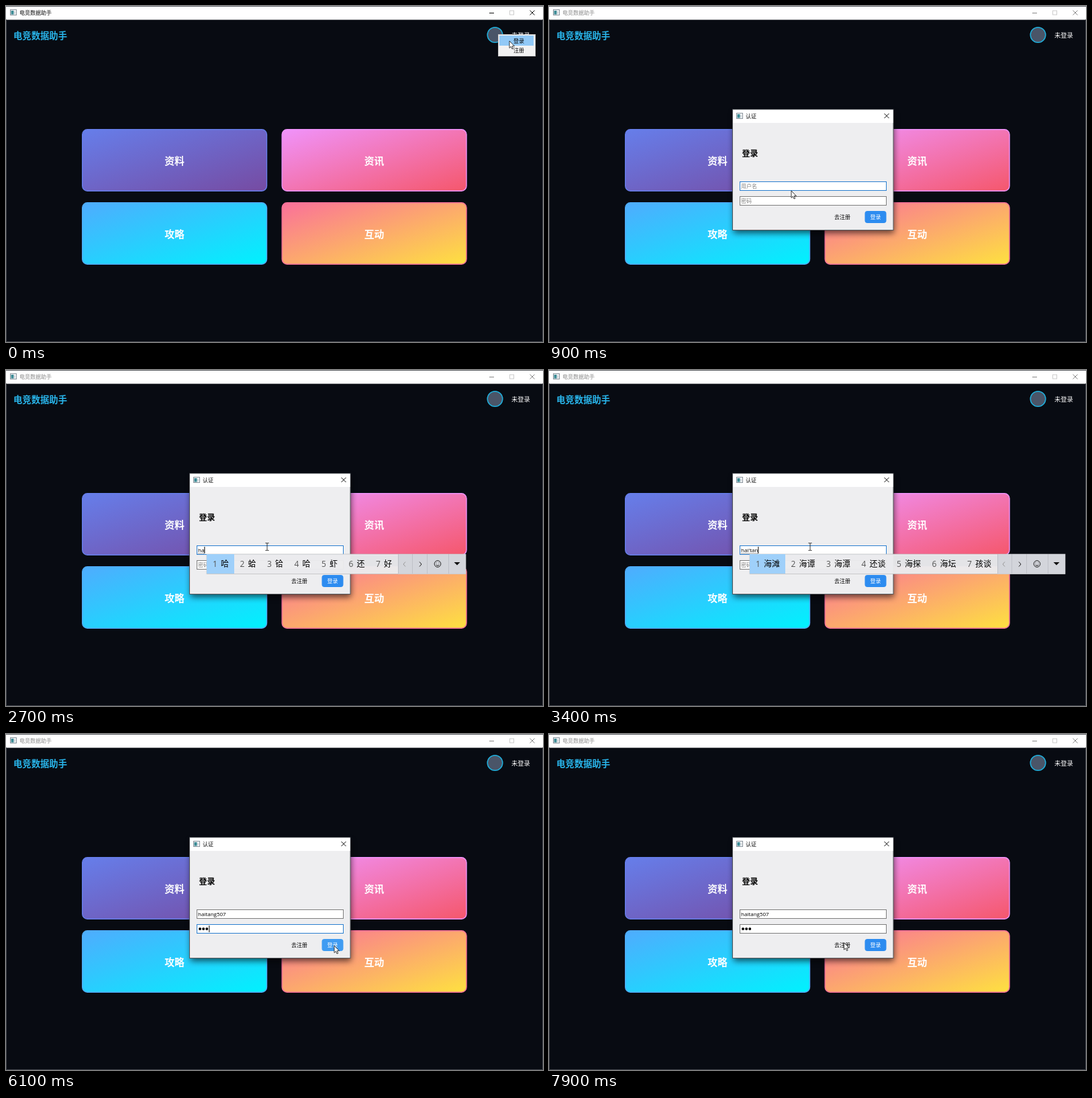
Recreate the animation shown at these times as an HTML page. Size 800 by 500 pixels, loop 8000 ms.

```html
<!DOCTYPE html>
<html lang="zh-CN">
<head>
<meta charset="utf-8">
<style>
html, body { margin: 0; width: 100%; height: 100%; overflow: hidden; background: #080b12; }
svg { display: block; width: 800px; height: 500px; }
text { font-family: "Open Sans", "Noto Sans CJK SC", "Noto Sans CJK", sans-serif; font-size: 8px; white-space: pre; }
.bold { font-weight: 700; }
</style>
</head>
<body>
<svg id="stage" viewBox="0 0 800 500">
  <defs>
    <filter id="shadow" x="-20%" y="-20%" width="140%" height="150%"><feGaussianBlur stdDeviation="5"/></filter>
    <g id="appIcon">
      <rect x=".5" y=".5" width="9" height="8" fill="#f4f6f8" stroke="#8b949c"/>
      <rect x="1.5" y="2" width="4" height="5.5" fill="#3b8a94"/>
      <path d="M7 3v4" stroke="#b5bdc4"/>
    </g>
    <path id="cross" d="M-3.5-3.5 3.5 3.5M3.5-3.5-3.5 3.5" fill="none"/>
  </defs>
  <rect width="800" height="500" fill="#080b12"/>
  <rect width="800" height="20.5" fill="#fff"/>
  <path d="M.5 20V499.5H799.5V20" fill="none" stroke="#42464c"/>
  <path d="M0 .5H800" stroke="#5c5f63"/>
  <use href="#appIcon" x="6" y="5"/>
  <text id="caption" x="20" y="13">电竞数据助手</text>
  <g id="controls" stroke="#111">
    <path d="M720 10.5h7"/>
    <use href="#cross" x="784" y="10"/>
  </g>
  <rect x="750.5" y="7" width="6" height="6" fill="none" stroke="#ccc"/>
  <text class="bold" x="11" y="48.5" fill="#29b6ec" style="font-size:13.33px">电竞数据助手</text>
  <circle cx="728.5" cy="43" r="11.3" fill="#4a5568" stroke="#20afdc" stroke-width="1.5"/>
  <text x="753" y="46.6" fill="#fff" style="font-size:9.3px">未登录</text>
  <g id="cards"></g>

  <g id="menu">
    <rect x="733.5" y="42.5" width="55" height="32" fill="#f2f2f2" stroke="#c8c8c8"/>
    <rect x="735" y="44" width="51" height="15" fill="#91c9f7"/>
    <text x="756" y="54.5">登录</text>
    <text x="756" y="69">注册</text>
  </g>

  <g id="dialog">
    <rect x="275" y="159" width="239" height="179" opacity=".6" filter="url(#shadow)"/>
    <rect x="273.5" y="154" width="239.5" height="179.5" fill="#eeeef0" stroke="#55585c"/>
    <rect x="274" y="154.5" width="238.5" height="19.5" fill="#fff"/>
    <use href="#appIcon" x="279" y="159"/>
    <text x="293" y="166.5">认证</text>
    <use href="#cross" x="503" y="163.5" stroke="#111"/>
    <text class="bold" x="287.5" y="223.5" style="font-size:12px">登录</text>
    <rect id="userBox" x="284.5" y="261.5" width="218" height="13" fill="#fff"/>
    <rect id="passBox" x="284.5" y="283.5" width="218" height="13" fill="#fff"/>
    <text id="user" x="286" y="271"></text>
    <path id="underline" stroke="#111" stroke-width=".8" stroke-dasharray="1 1"/>
    <text id="passHint" x="286" y="293" fill="#858585">密码</text>
    <g id="dots"></g>
    <path id="caret" stroke="#000"/>
    <text x="425" y="317">去注册</text>
    <rect id="loginButton" x="470.5" y="305" width="32" height="18" rx="4"/>
    <text x="478.5" y="317" fill="#fff">登录</text>
  </g>

  <g id="ime"></g>
  <path id="arrow" d="M0 0V10.5L2.4 8.3 4 12 5.7 11.3 4.1 7.7H7.4Z" fill="#fff" stroke="#111" stroke-width=".8"/>
  <path id="beam" d="M-2.5-5.5H-.7L0-5 .7-5.5H2.5M0-5V5M-2.5 5.5H-.7L0 5 .7 5.5H2.5" fill="none" stroke="#222" stroke-width=".9"/>
</svg>
<script>
const LOOP = 8000;
const OPEN = 300, FOCUS_PASS = 4800, CLICK_LOGIN = 6400;
const $ = id => document.getElementById(id);
const show = (id, on) => $(id).setAttribute('display', on ? 'inline' : 'none');
const set = (id, attrs) => { for (const k in attrs) $(id).setAttribute(k, attrs[k]); };

const CARDS = [
  ['资料', 113, 183, '#667eea', '#764ba2'],
  ['资讯', 410.5, 183, '#f093fb', '#f5576c'],
  ['攻略', 113, 292, '#4facfe', '#00f2fe'],
  ['互动', 410.5, 292, '#fa709a', '#fee140']
];
$('cards').innerHTML = CARDS.map(([label, x, y, from, to], i) => `
  <linearGradient id="fill${i}" x2="1" y2="1"><stop stop-color="${from}"/><stop offset="1" stop-color="${to}"/></linearGradient>
  <rect x="${x + .7}" y="${y + .7}" width="274.8" height="91.6" rx="7.5" fill="url(#fill${i})" stroke="${from}" stroke-width="1.4"/>
  <text class="bold" x="${x + 138}" y="${y + 52.5}" fill="#fff" text-anchor="middle" style="font-size:14.8px">${label}</text>`).join('');

// [time, text, candidates while composing]
const TYPING = [
  [0, ''],
  [2500, 'h', '和 会 好 还 很 后 或'],
  [2650, 'ha', '哈 蛤 铪 哈 虾 还 好'],
  [2800, 'hai', '还 海 害 孩 嗨 亥 骇'],
  [3000, "hai't", '海滩 海棠 海图 海豚 还挺 海涛 海天'],
  [3150, "hai'ta", '海塔 还他 害她 还它 海獭 孩他 嗨他'],
  [3300, "hai'tan", '海滩 海谭 海潭 还谈 海探 海坛 孩谈'],
  [3500, "hai'tang", '海棠 海塘 海糖 还烫 海堂 害糖 海唐'],
  [3700, 'haitang'],
  [3900, 'haitang5'],
  [4050, 'haitang50'],
  [4250, 'haitang507']
];
const PASS_KEYS = [5150, 5350, 5600];
const POINTER = [
  [0, 750, 52], [150, 750, 52], [900, 361, 275], [1300, 389, 263], [4450, 389, 263],
  [4750, 385, 289], [5600, 385, 289], [6000, 489, 315], [6700, 489, 315], [7200, 439.5, 310.5], [LOOP, 439.5, 310.5]
];

$('dots').innerHTML = PASS_KEYS.map((_, i) =>
  `<circle cx="${289 + i * 5.1}" cy="290" r="2"/>`).join('');

function pointerAt(t) {
  const i = POINTER.findIndex(p => p[0] > t);
  const [t0, x0, y0] = POINTER[i - 1], [t1, x1, y1] = POINTER[i];
  const u = (t - t0) / (t1 - t0), e = u * u * (3 - 2 * u);
  return [x0 + (x1 - x0) * e, y0 + (y1 - y0) * e];
}

function candidateBar(list) {
  const words = list.split(' '), step = 28.5 + 12 * words[0].length;
  const end = 299 + step * words.length + 1.5;
  const items = words.map((word, i) => {
    const x = 308 + i * step;
    return `<text x="${x}" y="293" fill="#555" style="font-size:12px">${i + 1}</text>
      <text x="${x + 12}" y="293" style="font-size:12px">${word}</text>`;
  }).join('');
  return `<rect x="299" y="274" width="${end + 101 - 299}" height="29.5" fill="#ececee" fill-opacity=".97" stroke="#bbb" stroke-width=".7"/>
    <rect x="299" y="274" width="${step + .5}" height="29" fill="#9fd0fa"/>${items}
    <g transform="translate(${end} 0)" fill="none" stroke="#222">
      <rect y="274" width="101" height="29.5" fill="#d3d5db" stroke="none"/>
      <path d="M.5 274v29M21.5 274v29M43.5 274v29M75.5 274v29" stroke="#bfc1c8"/>
      <path d="M11 285.5l-3 3.5 3 3.5" stroke="#999"/>
      <path d="M32 285.5l3 3.5-3 3.5"/>
      <circle cx="59" cy="288.5" r="4.8"/>
      <path d="M56.5 290q2.5 2.5 5 0M57 286.5v1M61 286.5v1"/>
      <path d="M83.5 286h9l-4.5 4.5z" fill="#111" stroke="none"/>
    </g>`;
}

let barList = null;
function draw(t) {
  const opened = t >= OPEN;
  show('menu', t < 200);
  show('dialog', opened);
  set('caption', { fill: opened ? '#8c8c8c' : '#111' });
  set('controls', { stroke: opened ? '#888' : '#111' });

  const [typedAt, text, list] = TYPING.filter(k => k[0] <= t).pop();
  const user = $('user');
  user.textContent = text || '用户名';
  set('user', { fill: text ? '#000' : '#858585' });
  const textEnd = text && opened ? 286.5 + user.getComputedTextLength() : 286.5;
  show('underline', list);
  set('underline', { d: `M286 273H${textEnd}` });
  show('ime', list);
  if (list && list !== barList) $('ime').innerHTML = candidateBar(barList = list);

  const typed = PASS_KEYS.filter(k => k <= t);
  [...$('dots').children].forEach((dot, i) => dot.setAttribute('display', i < typed.length ? 'inline' : 'none'));
  show('passHint', !typed.length);

  const onPass = t >= FOCUS_PASS && t < CLICK_LOGIN, onUser = t < FOCUS_PASS;
  set('userBox', { stroke: onUser ? '#2b7fd0' : '#7e7e7e' });
  set('passBox', { stroke: onPass ? '#2b7fd0' : '#7e7e7e' });
  const blinkStart = onPass ? typed[typed.length - 1] || FOCUS_PASS : typedAt || OPEN;
  show('caret', (onUser || onPass) && (t - blinkStart) % 1060 < 530);
  const caretX = onPass ? (typed.length ? 287.5 + typed.length * 5.1 : 286.5) : textEnd;
  set('caret', { d: `M${caretX} ${onPass ? 285 : 263}v10` });

  const [x, y] = pointerAt(t);
  const overField = opened && x > 284 && x < 503 && (y > 261 && y < 274.5 || y > 283 && y < 297);
  const overLogin = x > 470 && x < 503 && y > 305 && y < 323;
  set('loginButton', { fill: overLogin ? '#409cf2' : '#2d8cf0' });
  show('arrow', !overField);
  show('beam', overField);
  set(overField ? 'beam' : 'arrow', { transform: `translate(${x} ${y})` });
}

const start = performance.now();
function tick() {
  draw((performance.now() - start) % LOOP);
  requestAnimationFrame(tick);
}
tick();
</script>
</body>
</html>
```
